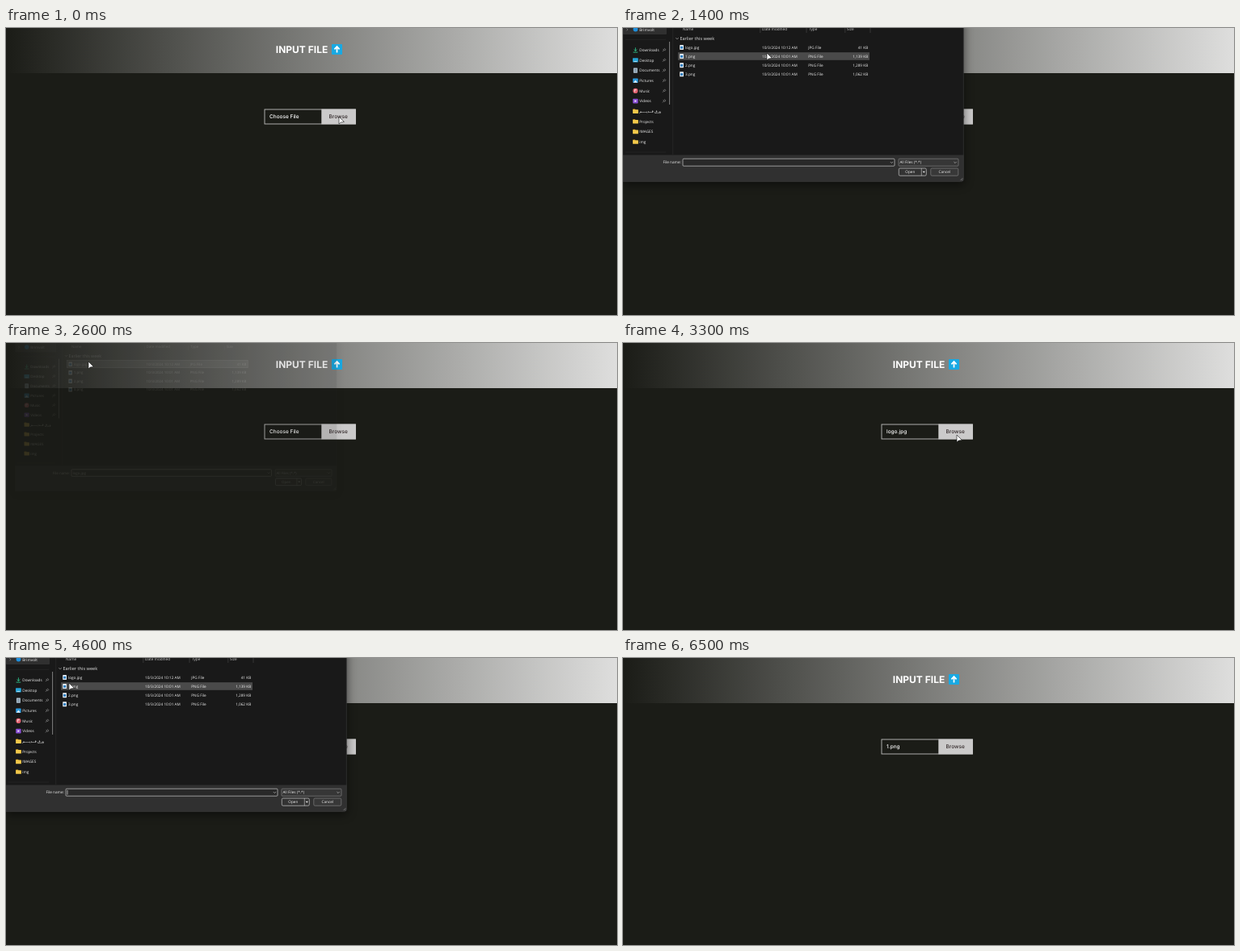
An HTML page for the animation above (7400 ms loop, 756x356 px).

```html
<!DOCTYPE html>
<html lang="en">
<head>
<meta charset="utf-8">
<title>Input file</title>
<style>
html, body { margin: 0; width: 100%; height: 100%; overflow: hidden; background: #1b1c17; }
svg { display: block; width: 756px; height: 356px; }
text { text-rendering: geometricPrecision; white-space: pre; }
.page text { font-family: Inter, sans-serif; font-weight: 500; font-size: 6.5px; }
.page .title { font-weight: 700; font-size: 12px; }
#dialog text { font-family: "Open Sans", "DejaVu Sans", sans-serif; font-size: 4.7px; fill: #f0f0f0; }
#dialog .head { fill: #c4c4c4; }
#dialog .group { font-size: 5.6px; fill: #dedede; }
#dialog .end { text-anchor: end; }
#dialog .mid { text-anchor: middle; }
#shadow { filter: blur(6px); }
</style>
</head>
<body>
<svg viewBox="0 0 756 356">
  <defs>
    <linearGradient id="fade">
      <stop offset="0" stop-color="#1b1c17"/>
      <stop offset="1" stop-color="#dededd"/>
    </linearGradient>
  </defs>
  <g class="page">
    <rect width="756" height="356" fill="#1b1c17"/>
    <rect width="756" height="56" fill="url(#fade)"/>
    <text class="title" x="333.8" y="31" fill="#fff">INPUT FILE</text>
    <rect x="403" y="20" width="13" height="13" rx="1" fill="#18a9e3"/>
    <path d="M409.5 30.4V23.5M406.4 26.4L409.5 23.1L412.6 26.4" fill="none" stroke="#fff" stroke-width="1.7"/>
    <rect x="320" y="101" width="112.5" height="18" fill="none" stroke="#bdbdbb" stroke-width=".9"/>
    <rect x="390.3" y="100.6" width="42.6" height="18.8" fill="#cbcaca"/>
    <text id="chosen" x="326" y="112.3" fill="#fff"></text>
    <text x="399.6" y="112.3" fill="#33292a">Browse</text>
  </g>
  <g id="dialog"></g>
  <path id="cursor" d="M0 0V9L2.2 7.1L6.4 6.4Z" fill="#fff" stroke="#111" stroke-width=".6" stroke-linejoin="round"/>
</svg>
<script>
const $ = id => document.getElementById(id);
const LOOP = 7400, STEP = 100;

const label = (x, y, s, cls = '') => `<text x="${x}" y="${y}" class="${cls}">${s}</text>`;
const box = (x, y, w, h, fill, more = '') =>
  `<rect x="${x}" y="${y}" width="${w}" height="${h}" fill="${fill}" ${more}/>`;
const line = (d, color, width = .6) =>
  `<path d="${d}" fill="none" stroke="${color}" stroke-width="${width}"/>`;
const edge = (color, rx = 1) => `stroke="${color}" stroke-width=".7" rx="${rx}"`;
const chevron = (x, y) => line(`M${x - 1.6} ${y - .8}l1.6 1.6l1.6 -1.6`, '#ccc');

// Sidebar icons, drawn around their own centre
const icons = {
  down: line('M0 -3V1.2M-1.8 -.6L0 1.2L1.8 -.6M-2.8 2.8H2.8', '#2fc48d', .9),
  desk: box(-3.4, -2.6, 6.8, 5.2, '#27a3d6', 'rx=".7"') + box(-2, 1.2, 4, .8, '#d9f3ff'),
  doc: box(-2.5, -3.1, 5, 6.2, '#a9bccb', 'rx=".5"') + line('M-1.4 -1H1.4M-1.4 .8H1.4', '#4c6478'),
  pic: box(-3.2, -2.8, 6.4, 5.6, '#2c9ade', 'rx=".7"') + '<path d="M-2.6 2.4L0 -.6L2.6 2.4Z" fill="#e8f6ff"/>',
  music: '<circle r="3.1" fill="#e0606f"/>' + line('M-.8 1.4V-1.4L1.2 -1', '#fff', .8),
  video: box(-3.2, -2.9, 6.4, 5.8, '#8a4fd6', 'rx=".8"') + '<path d="M-.9 -1.4L1.5 0L-.9 1.4Z" fill="#fff"/>',
  folder: box(-3.3, -2.7, 3.2, 2, '#d9a520', 'rx=".5"') + box(-3.3, -1.9, 6.8, 4.6, '#f3c94b', 'rx=".5"')
};
const places = [
  ['down', 'Downloads'], ['desk', 'Desktop'], ['doc', 'Documents'], ['pic', 'Pictures'],
  ['music', 'Music'], ['video', 'Videos'], ['folder', 'ورق قــديــــم'],
  ['folder', 'Projects'], ['folder', 'IMAGES'], ['folder', 'img']
];
const files = [
  ['logo.jpg', '10:12', 'JPG', '41'], ['1.png', '10:01', 'PNG', '1,139'],
  ['2.png', '10:01', 'PNG', '1,289'], ['3.png', '10:01', 'PNG', '1,062']
];
const rowY = i => 24 + i * 11.1;

function sidebar() {
  const items = places.map(([icon, name], i) => {
    const y = 27.3 + i * 12.65;
    const pin = i < 6 ? line(`M49 ${y + 1.8}l1.6 -1.6M49.6 ${y - 1}l2 2M50.4 ${y - .8}l1.2 -1l1.2 1.2l-1 1.2`, '#aaa') : '';
    return `<g transform="translate(15.4 ${y})">${icons[icon]}</g>` + label(20.3, y + 1.7, name) + pin;
  });
  return box(0, -5, 54, 13, '#303030', 'rx="1"') + line('M4.4 .4l1.5 1.5l-1.5 1.5', '#999') +
    '<circle cx="15.5" cy="1.5" r="2.9" fill="#1e8fdc"/>' + label(20.3, 3.8, 'Brimvolt') +
    line('M3 14.3H53M3 154H53', '#2b2b2b') + line('M57.6 17V95', '#8c8c8c', .9) +
    line('M61.7 0V157', '#303030') + items.join('');
}

function list() {
  const heads = [[74, 'Name'], [172, 'Date modified'], [230, 'Type'], [277, 'Size']];
  const rows = files.map(([name, time, type, size], i) => {
    const y = rowY(i), base = y + 1.7;
    return box(68, y - 4.9, 237, 9.6, 'none', `id="row${i}" stroke-width=".7"`) +
      box(70.2, y - 3, 4.8, 6, '#e6edf3', 'rx=".4"') + box(71.1, y - 1.2, 3, 2.8, '#2a7cc0') +
      label(77, base, name) + label(172, base, `10/3/2024 ${time} AM`) +
      label(229.3, base, type + ' File') + label(303.2, base, size + ' KB', 'end');
  });
  return heads.map(([x, s]) => label(x, 2.7, s, 'head')).join('') +
    line('M169.8 0V6M227 0V6M274.8 0V6M306 0V6', '#4a4a4a') +
    chevron(67, 13) + label(70.4, 15, 'Earlier this week', 'group') + rows.join('');
}

function footer() {
  return '<path d="M0 157.5H421.5V187.5Q421.5 190.5 418.5 190.5H0Z" fill="#303030"/>' +
    label(71.8, 168.3, 'File name:', 'end') +
    box(74, 162.2, 262, 9, '#292929', edge('#c9c9c9')) +
    label(75.6, 168.4, '', 'name') + line('M76 163.8V169.6', '#fff', .6).replace('<path', '<path id="caret"') +
    chevron(332.4, 166.8) +
    box(341, 162.2, 74, 9, '#363636', edge('#808080')) + label(342.4, 168.3, 'All Files (*.*)') + chevron(411, 166.8) +
    box(341.3, 174, 34, 9.2, '#333', edge('#c9c9c9', 1.5)) + line('M369.3 174V183.2', '#c9c9c9') +
    label(355.3, 180.2, 'Open', 'mid') + '<path d="M370.7 177.8h3.2l-1.6 1.9z" fill="#eee"/>' +
    box(380.8, 174, 34, 9.2, '#383838', edge('#808080', 1.5)) + label(397.8, 180.2, 'Cancel', 'mid') +
    line('M417.5 189l3 -3M419.3 189l1.2 -1.2', '#999');
}

$('dialog').innerHTML =
  box(0, -56, 422, 250, '#000', 'id="shadow" opacity=".5"') +
  box(0, -60, 421.5, 250.5, '#191919', 'rx="3"') +
  sidebar() + list() + footer() +
  line('M421.3 0V187.5Q421.3 190.3 418.5 190.3H0', '#454545', .5);
const nameField = document.querySelector('.name');

// time, x, y
const cursorTrack = [
  [0, 412, 110], [200, 412, 110], [900, 391, 107], [1000, 391, 108], [1300, 391, 108],
  [1400, 178, 31], [1700, 102, 23], [2600, 102, 23], [3100, 391, 107], [3300, 413, 114],
  [4100, 413, 114], [4600, 78, 31], [4900, 99, 38], [5800, 99, 38],
  [6300, 353, 21], [6400, 347, 4], [6500, 345, -20]
];
// time, opacity
const dialogTrack = [
  [0, 0], [100, 0], [200, .15], [300, .7], [400, 1], [2400, 1], [2500, .57], [2600, .12], [2700, 0],
  [3800, 0], [3900, .15], [4000, .7], [4100, 1], [5600, 1], [5700, .57], [5800, .12], [5900, 0]
];

function at(track, t) {
  const i = track.findIndex(k => k[0] > t);
  if (i < 0) return track[track.length - 1].slice(1);
  const a = track[i - 1], b = track[i], p = (t - a[0]) / (b[0] - a[0]);
  return a.slice(1).map((v, n) => v + (b[n + 1] - v) * p);
}
const within = (t, from, to) => t >= from && t < to;

function draw(t) {
  const [x, y] = at(cursorTrack, t), [shown] = at(dialogTrack, t);
  const picked = within(t, 1800, 2700) ? 0 : within(t, 5200, 5900) ? 1 : -1;
  const scale = 1 - .063 * (1 - shown);

  $('chosen').textContent = t < 2700 ? 'Choose File' : t < 5900 ? 'logo.jpg' : '1.png';
  $('dialog').setAttribute('opacity', shown);
  $('dialog').setAttribute('transform', `translate(200 65) scale(${scale}) translate(-200 -65)`);
  files.forEach((f, i) => {
    const hover = within(x, 68, 305) && Math.abs(y - rowY(i)) < 5;
    $('row' + i).setAttribute('fill', i === picked ? '#505050' : hover ? '#4a4a4a' : 'none');
    $('row' + i).setAttribute('stroke', i === picked ? '#a0a0a0' : 'none');
  });
  nameField.textContent = picked < 0 ? '' : files[picked][0];
  $('caret').setAttribute('opacity', within(t, 4400, 4900) ? 1 : 0);
  $('cursor').setAttribute('transform', `translate(${x} ${y})`);
}

const start = performance.now();
function tick() {
  const t = (performance.now() - start) % LOOP;
  draw(Math.floor(t / STEP) * STEP);
  requestAnimationFrame(tick);
}
tick();
</script>
</body>
</html>
```
